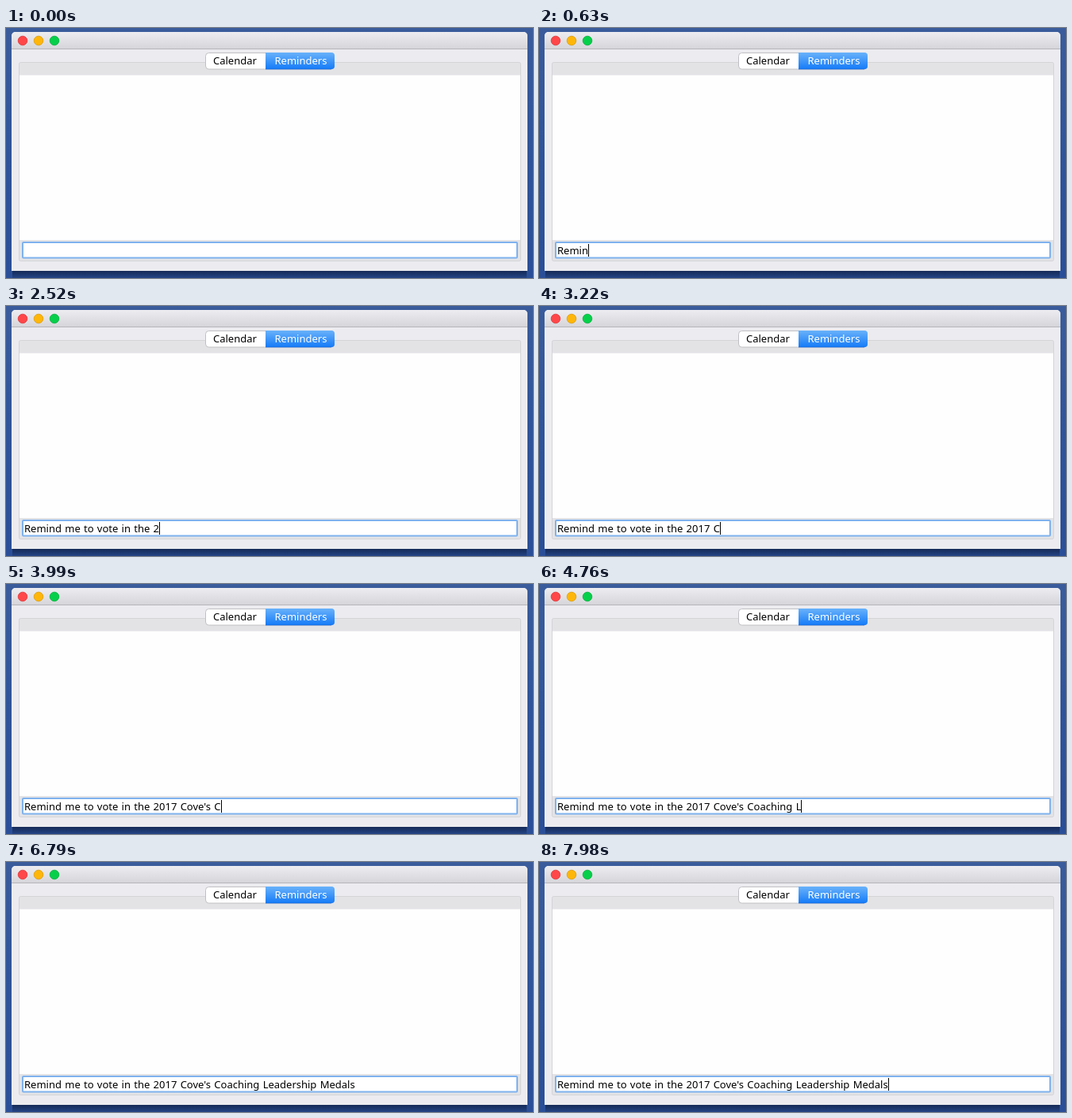
An HTML page for the animation above (8000 ms loop, 664x316 px).

```html
<!DOCTYPE html>
<html lang="en">
<head>
<meta charset="utf-8">
<title>Reminders</title>
<style>
  html, body { margin: 0; width: 100%; height: 100%; overflow: hidden; }
  body { position: relative; font: 13px/20px "Noto Sans", "Open Sans", sans-serif; }
  svg { position: absolute; left: 0; top: 0; display: block; }
  svg text { font: 13px "Noto Sans", "Open Sans", sans-serif; }
  #line {
    position: absolute; left: 23px; top: 271px; height: 20px;
    white-space: pre; word-spacing: .9px; color: #000;
  }
  #caret {
    display: inline-block; width: 1px; height: 16px; margin-top: 2px;
    vertical-align: top; background: #000;
  }
</style>
</head>
<body>
<svg width="664" height="316" viewBox="0 0 664 316">
  <defs>
    <linearGradient id="desk" x2="0" y2="1">
      <stop offset="0" stop-color="#3a5c9c"/>
      <stop offset=".5" stop-color="#2f549a"/>
      <stop offset="1" stop-color="#2a4f98"/>
    </linearGradient>
    <linearGradient id="bar" x2="0" y2="1">
      <stop offset="0" stop-color="#ededf1"/>
      <stop offset="1" stop-color="#d6d6da"/>
    </linearGradient>
    <linearGradient id="blue" x2="0" y2="1">
      <stop offset="0" stop-color="#69b2fa"/>
      <stop offset="1" stop-color="#157bf8"/>
    </linearGradient>
    <linearGradient id="shade" x2="0" y2="1">
      <stop offset="0" stop-color="#0c1a3a" stop-opacity=".75"/>
      <stop offset="1" stop-color="#0c1a3a" stop-opacity=".2"/>
    </linearGradient>
  </defs>

  <rect width="664" height="316" fill="url(#desk)"/>
  <rect x="8" y="306" width="648" height="10" fill="url(#shade)"/>

  <!-- window -->
  <path d="M7 307V10a5 5 0 0 1 5-5H652a5 5 0 0 1 5 5V307Z" fill="#ececf0"/>
  <path d="M7 26V10a5 5 0 0 1 5-5H652a5 5 0 0 1 5 5V26Z" fill="url(#bar)"/>
  <path d="M7 26.5H657" stroke="#b6b6ba"/>
  <g stroke-width=".8">
    <circle cx="21" cy="16" r="5.8" fill="#ff4649" stroke="#e0383c"/>
    <circle cx="41" cy="16" r="5.8" fill="#ffb60a" stroke="#de9c0a"/>
    <circle cx="61" cy="16" r="5.8" fill="#06cf4a" stroke="#0ab040"/>
  </g>

  <!-- tab pane -->
  <rect x="16.5" y="43.5" width="632" height="251" rx="2" fill="#e3e3e6" stroke="#d4d4d8"/>
  <rect x="17" y="59" width="631" height="209" fill="#fefefe"/>
  <path d="M17 59.5H648" stroke="#ededf0"/>

  <!-- tabs -->
  <rect x="251.5" y="31.5" width="162" height="20.5" rx="4" fill="#fff" stroke="#c0c0c4"/>
  <path d="M327 31H410a4 4 0 0 1 4 4V48a4 4 0 0 1-4 4H327Z" fill="url(#blue)"/>
  <path d="M327 52H410" stroke="#1a66d0" stroke-opacity=".7"/>
  <text x="261" y="46">Calendar</text>
  <text x="338.5" y="46" fill="#fff">Reminders</text>

  <!-- input -->
  <rect x="21" y="271" width="623" height="19.5" rx="1" fill="#fff" stroke="#7fb2ee" stroke-width="2"/>
</svg>
<div id="line"><span id="typed"></span><span id="caret"></span></div>

<script>
const LOOP = 8000, STEP = 70, BLINK = 420;
const TYPING_START = 136, KEY_TIME = 86.5, SLOW_KEY = 1.7;
const message = "Remind me to vote in the 2017 Cove's Coaching Leadership Medals";
const typed = document.getElementById("typed");
const caret = document.getElementById("caret");

// Capitals, digits and punctuation take longer to reach.
let clock = TYPING_START;
const keyTimes = [...message].map(key =>
  clock += KEY_TIME * (/[a-z ]/.test(key) ? 1 : SLOW_KEY));
const typingEnd = clock;

function caretShown(time) {
  if (time < typingEnd) return time >= BLINK / 2;
  return Math.floor((time - typingEnd) / BLINK) % 2 === 0;
}

function draw(now) {
  const time = Math.floor((now % LOOP) / STEP) * STEP;
  const count = keyTimes.filter(t => t <= time).length;
  typed.textContent = message.slice(0, count);
  caret.style.visibility = caretShown(time) ? "visible" : "hidden";
}

let start;
function tick(now) {
  start ??= now;
  draw(now - start);
  requestAnimationFrame(tick);
}
draw(0);
requestAnimationFrame(tick);
</script>
</body>
</html>
```
